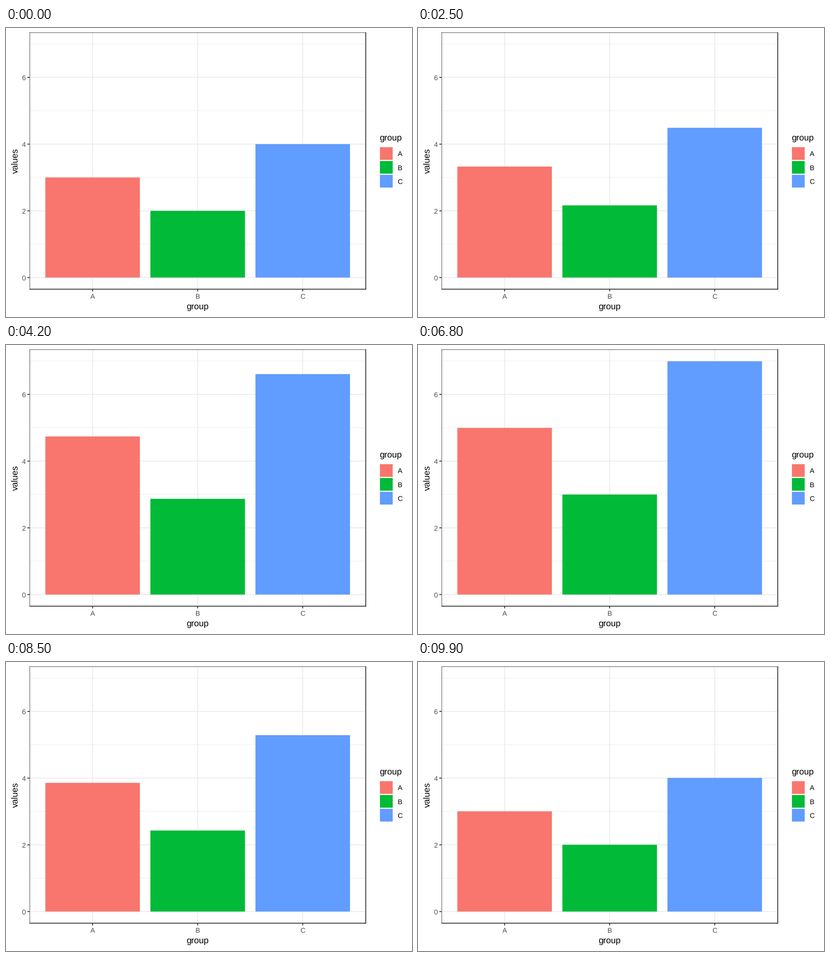
These frames come from a looping animation (885 px wide and 632 px high, 10000 ms). A matplotlib script:

```python
import math

import matplotlib.pyplot as plt
from matplotlib.animation import FuncAnimation
from matplotlib.patches import Rectangle

W, H, DPI = 885, 632, 100
FRAMES, INTERVAL = 100, 100

# Panel geometry in pixels, y pointing down
LEFT, RIGHT, TOP, BOTTOM = 51.4, 784.2, 9.62, 571.2
Y_ZERO, UNIT = 545.7, 72.95
CENTERS = (188.8, 417.8, 646.8)
BAR_WIDTH = 206.1
THICK, THIN, TICK = 1.87, 0.94, 4.81
TITLE_SIZE, TEXT_SIZE = 19.3, 15.45

GROUPS = "ABC"
COLORS = ("#F8766D", "#00BA38", "#619CFF")
LOW, HIGH = (3, 2, 4), (5, 3, 7)
GRID, DARK, LABEL = "#EBEBEB", "#333333", "#4D4D4D"

# Frames in which the bars start and stop moving
RISE, HOLD, FALL = 16, 50, 67

plt.rcParams["font.family"] = "Liberation Sans"
plt.rcParams["text.hinting"] = "none"
plt.rcParams["text.hinting_factor"] = 1

fig = plt.figure(figsize=(W / DPI, H / DPI), dpi=DPI, facecolor="white")
ax = fig.add_axes([0, 0, 1, 1])
ax.set_xlim(0, W)
ax.set_ylim(H, 0)
ax.axis("off")


def y_pos(value):
    return Y_ZERO - UNIT * value


def box(x0, y0, x1, y1, color, z=1):
    patch = Rectangle((x0, y0), x1 - x0, y1 - y0, facecolor=color,
                      linewidth=0, zorder=z, snap=False)
    return ax.add_patch(patch)


def hline(x0, x1, y, width, color, z=1):
    box(x0, y - width / 2, x1, y + width / 2, color, z)


def vline(x, y0, y1, width, color, z=1):
    box(x - width / 2, y0, x + width / 2, y1, color, z)


def label(x, y, text, size, color="black", ha="center", **kwargs):
    ax.text(x, y, text, fontsize=size * 72 / DPI, color=color, ha=ha,
            va="baseline", zorder=5, **kwargs)


def draw_panel():
    for value in (1, 3, 5, 7):
        hline(LEFT, RIGHT, y_pos(value), THIN, GRID)
    for value in (0, 2, 4, 6):
        y = y_pos(value)
        hline(LEFT, RIGHT, y, THICK, GRID)
        hline(LEFT - TICK, LEFT, y, THICK, DARK, 4)
        label(42.7, y + 5.8, str(value), TEXT_SIZE, LABEL, "right")
    for x, name in zip(CENTERS, GROUPS):
        vline(x, TOP, BOTTOM, THICK, GRID)
        vline(x, BOTTOM, BOTTOM + TICK, THICK, DARK, 4)
        label(x, 592.3, name, TEXT_SIZE, LABEL)

    # The outer half of the border is cut off at the left and top
    half = THICK / 2
    box(LEFT, TOP, LEFT + half, BOTTOM + half, DARK, 4)
    box(LEFT, TOP, RIGHT + half, TOP + half, DARK, 4)
    vline(RIGHT, TOP, BOTTOM + half, THICK, DARK, 4)
    hline(LEFT, RIGHT + half, BOTTOM, THICK, DARK, 4)

    label((LEFT + RIGHT) / 2, 615.5, "group", TITLE_SIZE)
    label(25.5, (TOP + BOTTOM) / 2, "values", TITLE_SIZE, ha="right",
          va_center=True) if False else ax.text(
        25.5, (TOP + BOTTOM) / 2, "values", fontsize=TITLE_SIZE * 72 / DPI,
        rotation=90, rotation_mode="anchor", ha="center", va="baseline")


def draw_legend():
    label(813.9, 245.8, "group", TITLE_SIZE, ha="left")
    for i, (name, color) in enumerate(zip(GROUPS, COLORS)):
        y = 274.5 + 30.25 * i
        box(815.1, y - 13.9, 842.9, y + 13.9, color)
        label(853.5, y + 5.8, name, TEXT_SIZE, ha="left")


def ease(t):
    t = min(max(t, 0), 1)
    return (1 - math.cos(math.pi * t)) / 2


def update(frame):
    rise = ease((frame - RISE) / (HOLD - RISE))
    fall = ease((frame - FALL) / (FRAMES - FALL))
    for bar, low, high in zip(bars, LOW, HIGH):
        value = low + (high - low) * (rise - fall)
        bar.set_y(y_pos(value))
        bar.set_height(UNIT * value)
    return bars


draw_panel()
draw_legend()
bars = [box(x - BAR_WIDTH / 2, y_pos(low), x + BAR_WIDTH / 2, Y_ZERO, color, 3)
        for x, low, color in zip(CENTERS, LOW, COLORS)]

anim = FuncAnimation(fig, update, frames=FRAMES, interval=INTERVAL,
                     repeat=True, repeat_delay=0, blit=False)
plt.show()
```
